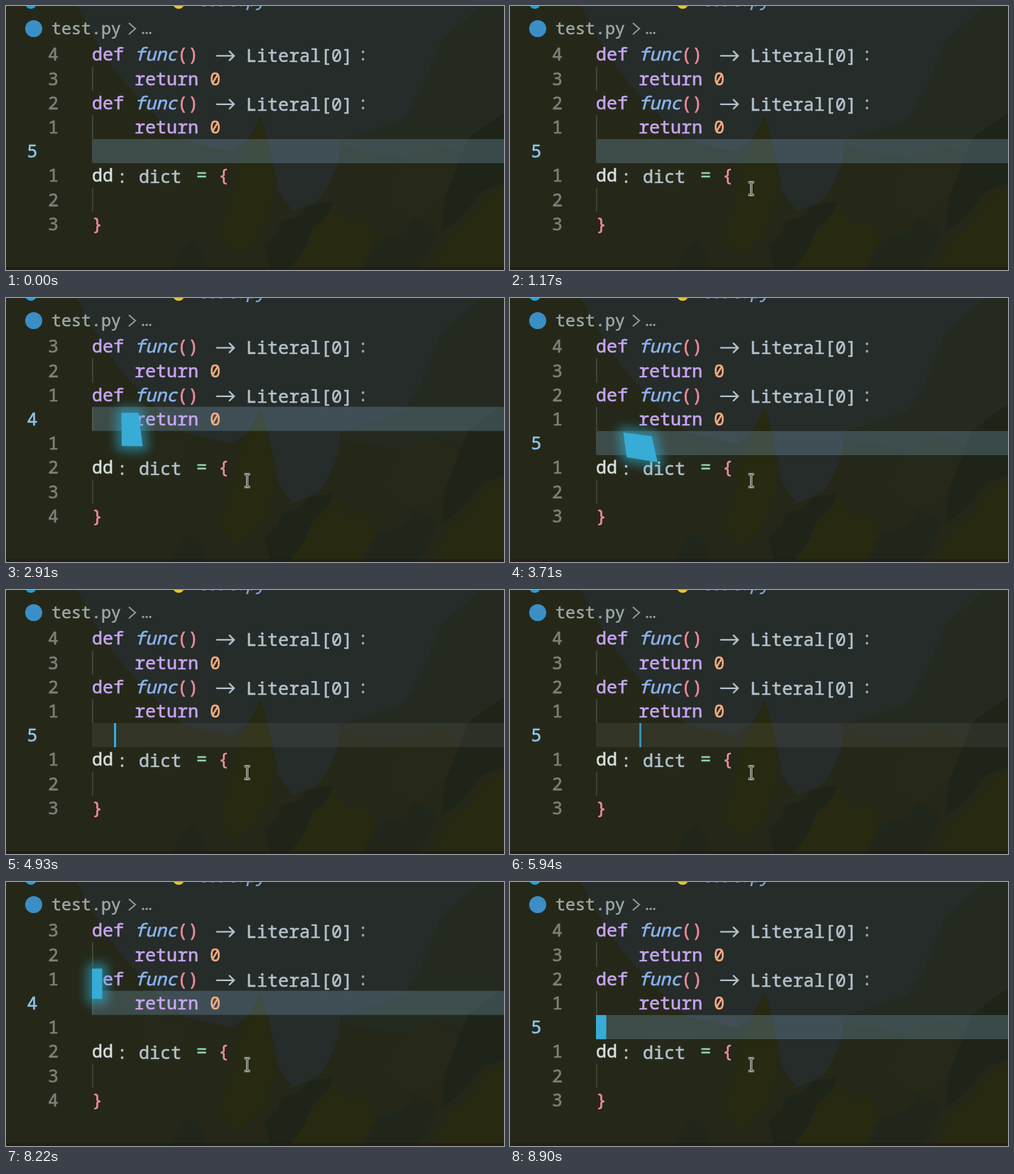
An HTML page that plays this animation: 701 by 373 pixels, repeating every 9.02 s.

```html
<!DOCTYPE html>
<html lang="en">
<head>
<meta charset="utf-8">
<title>Editor cursor</title>
<style>
html, body { margin: 0; width: 100%; height: 100%; overflow: hidden; background: #252819; }
svg { display: block; width: 701px; height: 373px; }
text {
  font-family: "Noto Sans Mono", "DejaVu Sans Mono", monospace; font-size: 25px; white-space: pre;
  fill: currentColor; stroke: currentColor; stroke-width: .55px;
}
</style>
</head>
<body>
<svg id="stage" viewBox="0 0 701 373" xmlns="http://www.w3.org/2000/svg">
  <defs>
    <filter id="blur" filterUnits="userSpaceOnUse" x="0" y="-60" width="701" height="460">
      <feGaussianBlur stdDeviation="7"/>
    </filter>
  </defs>
  <rect width="701" height="373" fill="#252819"/>
  <path fill="#252a20" d="M580 0H701V150L668 172 650 214 610 196 560 214 470 200Z"/>
  <path fill="#262c29" d="M100 0H668L612 50 584 120 560 160 470 190Q472 230 440 274L404 290 384 262 372 205 360 158 340 190 318 206 250 190 216 160 170 112 138 70Z"/>
  <path fill="#272910" d="M358 156L368 190 378 246 372 290 352 330 322 352 300 320 318 270 326 226Z"/>
  <path fill="#26291a" d="M196 176L226 200 262 196 254 250 226 270 190 246ZM560 214L600 196 640 216 626 262 590 300 548 290 530 262Z"/>
  <path fill="#1f2419" d="M372 373L364 338 382 322 388 304 412 298 426 282 460 276 452 300 432 314 420 344 398 373ZM650 188L701 150V250L670 262 640 300 612 320 618 270Z"/>
  <path fill="#272a10" d="M398 373L422 342 434 314 464 284 480 310 504 300 520 330 500 373Z"/>
  <path fill="#21261a" d="M500 373L524 332 560 320 574 300 606 316 600 340 580 373ZM232 373L244 346 262 330 276 348 284 373Z"/>
  <path fill="#272910" d="M600 373L624 326 650 306 676 268 701 256V373Z"/>
  <rect y="369" width="701" height="4" fill="#211c16" opacity=".6"/>
  <rect id="row" x="121" width="582" height="34" rx="2"/>
  <g id="code"></g>
  <circle cx="35" cy="-4" r="8" fill="#2f9bd3"/>
  <circle cx="243" cy="-4" r="8" fill="#e8c53c"/>
  <circle cx="39" cy="32" r="12" fill="#3b8fc6"/>
  <path d="M173 24L182 32 173 40" fill="none" stroke="#8f9997" stroke-width="2"/>
  <g fill="#a3adab"><circle cx="193" cy="38" r="1.6"/><circle cx="198" cy="38" r="1.6"/><circle cx="203" cy="38" r="1.6"/></g>
  <polygon id="glow" fill="#2fb4dc" stroke="#2fb4dc" stroke-width="16" stroke-linejoin="round" filter="url(#blur)"/>
  <polygon id="cursor" fill="#36acd6"/>
  <g id="mouse" fill="none">
    <path d="M-4 -9H-1L0 -8 1 -9H4M0 -8V8M-4 9H-1L0 8 1 9H4" stroke="#d9dddb" stroke-width="3"/>
    <path d="M-3.5 -9H-1L0 -8 1 -9H3.5M0 -8V8M-3.5 9H-1L0 8 1 9H3.5" stroke="#1d211d" stroke-width="1"/>
  </g>
</svg>
<script>
const LOOP = 9020, TOP = 51.2, PITCH = 34.2, SETTLE = 360;
const BLUE = 'rgba(120,160,185,.3)', GREY = 'rgba(255,255,255,.06)';
const el = id => document.getElementById(id);
const row = el('row'), glow = el('glow'), cursor = el('cursor'), mouse = el('mouse'), code = el('code');

function add(name, attrs, content = '') {
  const node = document.createElementNS('http://www.w3.org/2000/svg', name);
  for (const key in attrs) node.setAttribute(key, attrs[key]);
  node.textContent = content;
  return code.appendChild(node);
}
const text = (x, y, color, content, extra) => add('text', { x, y, color, ...extra }, content);
const lineTop = n => TOP + PITCH * (n - 1);
const baseline = n => lineTop(n) + 26.2;
const italic = { 'font-style': 'italic' };

function guide(n, color) {
  add('rect', { x: 121.5, y: lineTop(n), width: 1, height: PITCH, fill: color });
}

function drawFunc(n) {
  const y = baseline(n), hint = '#b3c2cd';
  text(121, y, '#c8a6f4', 'def');
  text(181, y, '#8cb6f2', 'func', italic);
  text(241, y, '#ee8c9b', '()');
  add('path', { d: `M296 ${y - 7}H321M314 ${y - 14}L321 ${y - 7} 314 ${y}`, fill: 'none', stroke: hint, 'stroke-width': 2.3 });
  text(338, y + 2, hint, 'Literal[0]');
  text(495, y, '#9ba7ab', ':');
  text(181, baseline(n + 1), '#c8a6f4', 'return');
  text(287, baseline(n + 1), '#f6ae80', '0');
  guide(n + 1, '#5c625b');
}

text(64, 40, '#9da8a6', 'test.py', { style: 'font-size:23.3px' });
text(269, 0, '#86a9dc', 'test.py', { ...italic, style: 'font-size:23px' });
drawFunc(1);
drawFunc(3);
text(121, baseline(6), '#d6dfdf', 'dd');
text(156, baseline(6) + 2, '#b3c2cd', ':');
text(187, baseline(6) + 2, '#b3c2cd', 'dict');
text(268, baseline(6), '#8fd2b3', '=');
text(299, baseline(6), '#ee8c9b', '{');
guide(7, '#62584b');
text(121, baseline(8), '#ee8c9b', '}');
const numbers = Array.from({ length: 8 }, (_, i) => text(59, baseline(i + 1), '#7d827b', ''));

// Cursor jumps: time, line, x, width, row colour
const BLOCK = 14.5, BAR = 3;
const jumps = [
  [1330, 7, 166],
  [2670, 6, 268], [2750, 5, 121], [2830, 4, 166],
  [2990, 3, 166], [3030, 2, 166], [3070, 1, 166],
  [3110, 2, 166], [3150, 3, 166], [3180, 4, 166], [3210, 5, 121], [3240, 6, 268],
  [3590, 5, 121],
  [4450, 5, 152, BAR, GREY], [5380, 5, 182, BAR, GREY],
  [6640, 5, 121],
  [7980, 4, 121], [8100, 3, 121], [8220, 4, 121], [8330, 5, 121], [8400, 6, 121], [8480, 5, 121]
].map(([time, line, x, width = BLOCK, color = BLUE]) => ({ time, line, color, to: box(x, lineTop(line), width) }));

function box(x, y, w) {
  return [[x, y], [x + w, y], [x + w, y + PITCH], [x, y + PITCH]];
}

const SIDES = [[-1, -1], [1, -1], [1, 1], [-1, 1]];

// Corners facing the motion close in sooner than the trailing ones
function pose(jump, time) {
  const { from, to } = jump;
  const left = Math.max(0, 1 - (time - jump.time) / SETTLE);
  const dx = to[0][0] - from[0][0], dy = to[0][1] - from[0][1];
  const len = Math.hypot(dx, dy) || 1;
  return to.map(([x, y], i) => {
    const lead = (SIDES[i][0] * dx + SIDES[i][1] * dy) / len / Math.SQRT2;
    return [
      x + (from[i][0] - x) * left ** (2.5 + .9 * lead),
      y + (from[i][1] - y) * left ** (5 + 2.3 * lead)
    ];
  });
}

jumps.forEach((jump, i) => {
  jump.from = i ? pose(jumps[i - 1], jump.time) : box(135, -20, BLOCK);
});

// Fade start, fade end, back on
const fades = [[2140, 2260, 2670], [4890, 4891, 4930], [5940, 6060, 6640], [7370, 7490, 7980]];

function cursorAlpha(t) {
  if (t < jumps[0].time) return 0;
  const fade = fades.find(f => t >= f[0] && t < f[2]);
  return fade ? Math.max(0, 1 - (t - fade[0] + 30) / (fade[1] - fade[0] + 30)) : 1;
}

const clamp = v => Math.min(1, Math.max(0, v));

function drawMouse(t) {
  const glide = 1 - (1 - clamp((t - 180) / 540)) ** 2;
  const hop = clamp((t - 1050) / 120);
  mouse.setAttribute('transform', `translate(${166 + 155 * glide + 18.5 * hop} ${385 - 100 * glide - 27 * hop})`);
  mouse.setAttribute('opacity', t < 200 ? 0 : 1);
}

let shownLine = 0;
function drawLine(line, color) {
  row.setAttribute('fill', color);
  if (line === shownLine) return;
  shownLine = line;
  row.setAttribute('y', lineTop(line));
  numbers.forEach((node, i) => {
    const active = i + 1 === line;
    node.textContent = active ? line : Math.abs(i + 1 - line);
    node.setAttribute('x', active ? 29.5 : 59);
    node.setAttribute('color', active ? '#8ec6e9' : '#7d827b');
  });
}

function draw(t) {
  const jump = jumps.filter(j => j.time <= t).pop();
  drawLine(jump ? jump.line : 5, jump ? jump.color : BLUE);
  drawMouse(t);
  const alpha = cursorAlpha(t);
  cursor.setAttribute('opacity', alpha);
  if (!jump) return glow.setAttribute('opacity', 0);
  const corners = pose(jump, t);
  const gap = Math.max(...corners.map(([x, y], i) => Math.hypot(x - jump.to[i][0], y - jump.to[i][1])));
  const points = corners.map(p => p.map(v => v.toFixed(2)).join()).join(' ');
  cursor.setAttribute('points', points);
  glow.setAttribute('points', points);
  glow.setAttribute('opacity', alpha * .5 * clamp(gap / 12));
}

const start = performance.now();
function tick() {
  draw((performance.now() - start) % LOOP);
  requestAnimationFrame(tick);
}
tick();
</script>
</body>
</html>
```
